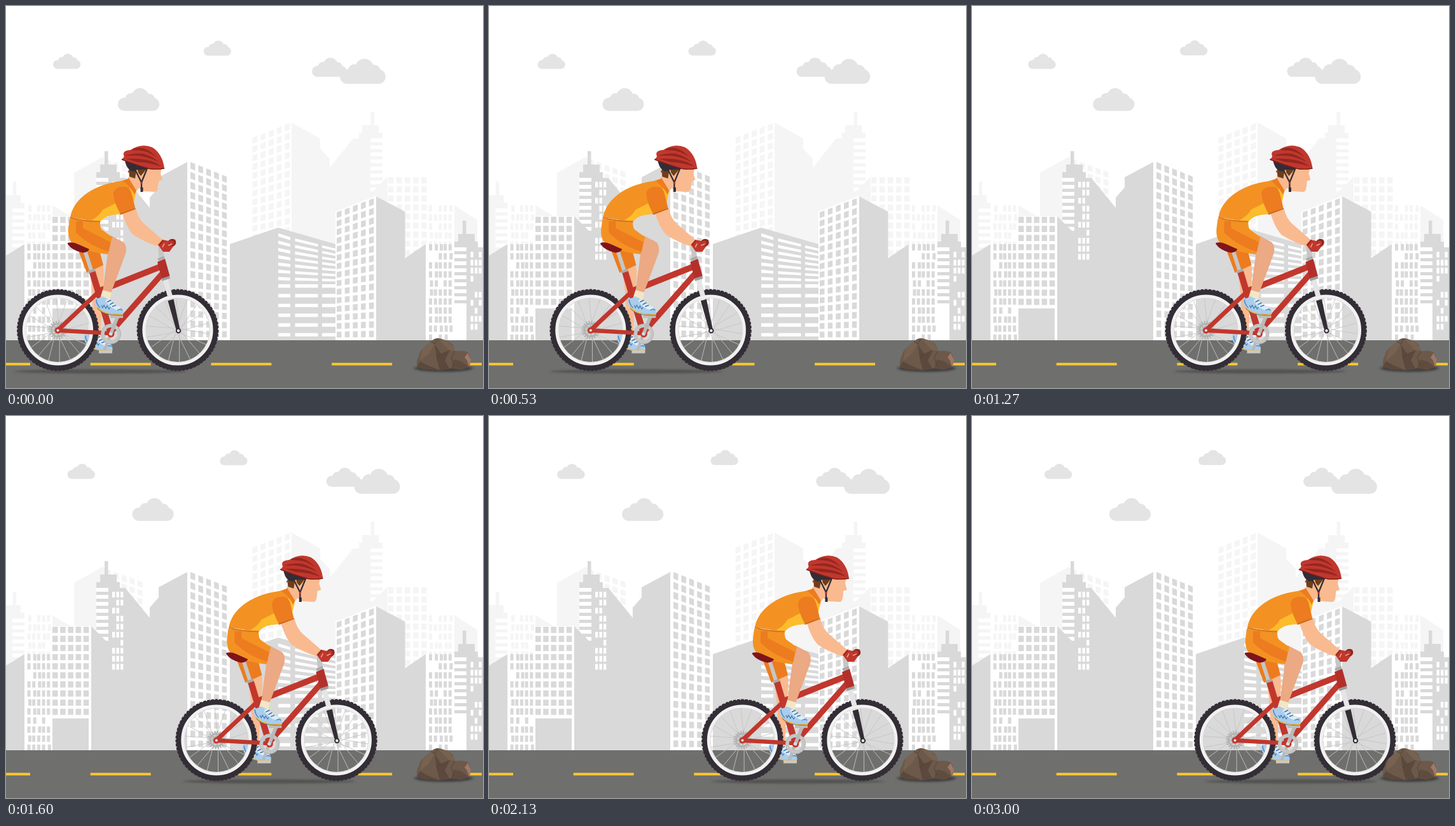
An HTML page that plays this animation: 750x600 px, repeating every 3070 ms.

```html
<!DOCTYPE html>
<html lang="en">
<head>
<meta charset="utf-8">
<title>City ride</title>
<style>
  html, body { margin: 0; width: 100%; height: 100%; overflow: hidden; background: #fff; }
  svg { display: block; width: 750px; height: 600px; }
</style>
</head>
<body>
<svg id="stage" viewBox="0 0 750 600" xmlns="http://www.w3.org/2000/svg"></svg>
<script>
const FAR = '#f5f5f5', NEAR = '#d9d9d9', WHITE = '#fff', DARK = '#332d36';
const RED = '#c1372d', DEEP = '#93271f', STEEL = '#c6c6c6';
const ORANGE = '#f39223', RUST = '#ec7c1f', YELLOW = '#fdbc2c';
const SKIN = '#f9ba90', TAN = '#eba984';

// --- markup helpers ---
const fill = (d, c) => `<path d="${d}" fill="${c}"/>`;
const line = (d, c, w, extra = '') =>
  `<path d="${d}" fill="none" stroke="${c}" stroke-width="${w}" ${extra}/>`;
const rect = (x, y, w, h, c) => `<rect x="${x}" y="${y}" width="${w}" height="${h}" fill="${c}"/>`;
const disc = (x, y, r, c) => `<circle cx="${x}" cy="${y}" r="${r}" fill="${c}"/>`;
const ring = (x, y, r, c, w, extra = '') =>
  `<circle cx="${x}" cy="${y}" r="${r}" fill="none" stroke="${c}" stroke-width="${w}" ${extra}/>`;
const group = (id, body) => `<g id="${id}">${body}</g>`;
const times = (n, f) => Array.from({ length: n }, (_, i) => f(i)).join('');

let seed = 11;
const random = () => (seed = (seed * 16807) % 2147483647) / 2147483647;

// --- buildings ---
// Window wall whose roof runs from yL to yR and whose foot is level at yB.
function wall(x0, cols, pitch, w, yL, yR, yB, rows, color, part = 0.68) {
  const span = (cols - 1) * pitch + w;
  const at = (x, f) => {
    const top = yL + (yR - yL) * (x - x0) / span;
    return `${x.toFixed(1)} ${(top + (yB - top) * f).toFixed(1)}`;
  };
  let d = '';
  for (let c = 0; c < cols; c++) for (let r = 0; r < rows; r++) {
    const a = x0 + c * pitch, b = a + w, f = r / rows, g = (r + part) / rows;
    d += `M${at(a, f)}L${at(b, f)}L${at(b, g)}L${at(a, g)}Z`;
  }
  return fill(d, color);
}

// Ribbon windows: sloping above, level below.
const ribbons = (x, w, yL, yR) =>
  wall(x, 1, w, w, yL, yR, 437, 7, WHITE, 0.45) + wall(x, 1, w, w, 437, 437, 529, 6, WHITE, 0.35);

function flats(x, y, rows, c) {
  let out = '';
  for (let r = 0; r < rows; r++) for (let i = 0; i < 5; i++) {
    const shift = random() < 0.3 ? 1.5 : 0;
    if (random() > 0.07) out += rect(x + i * 7.7 + shift, y + r * 14.2, 5, 10, c);
  }
  return out;
}

// Stepped top with a mast; the striped side starts at the given edge.
function tower(edge, y, dir, c) {
  const bar = (a, w, dy, h) => rect(dir > 0 ? edge + a : edge - a - w, y + dy, w, h, c);
  return bar(13, 5.5, 0, 22) + bar(6, 26, 21, 13) + bar(0, 37, 33, 9) +
    times(8, i => bar(0, 19, 48 + i * 11, 5));
}

function lights(x, y, rows) {
  let out = '';
  for (let r = 0; r < rows; r++) for (let i = 0; i < 3; i++)
    if (random() > 0.32) out += rect(x + i * 6.5, y + r * 12.6, 4.3, 9, WHITE);
  return out;
}

function city() {
  const far =
    tower(29, 276, -1, FAR) + rect(0, 318, 10, 100, FAR) +
    flats(33.5, 313, 5, FAR) +
    fill('M73 313L107 333V420H73Z M107 262L152 237L157 240V400H107Z', FAR) +
    wall(157, 5, 12.4, 8, 240, 261, 525, 20, FAR) +
    wall(387.5, 5, 12.7, 8, 207, 184, 525, 23, FAR) +
    fill('M449 183L494 208V224L509 240V254L546 208H573V295L600 268V525H449Z', FAR) +
    tower(592, 166, -1, FAR) +
    wall(601, 5, 13, 8.5, 269, 269, 525, 18, FAR) +
    flats(665, 313, 5, FAR) +
    fill('M705 313L741 336V420H705Z', FAR);

  const near =
    rect(29, 374, 44, 151, WHITE) + fill('M0 392L29 374V525H0Z', NEAR) +
    flats(33.5, 374, 11, NEAR) +
    rect(73, 330, 61, 195, WHITE) +
    wall(73, 5, 12.2, 8.5, 331, 331, 474, 10, NEAR) + rect(73, 475, 57, 50, NEAR) +
    rect(142, 270, 19, 88, WHITE) + tower(142, 228, 1, NEAR) +
    fill('M134 330L161 357V270H187.5L226 317V525H134Z', NEAR) + lights(167, 276, 10) +
    fill('M226 301L240 285V269L285 245V525H226Z', NEAR) +
    wall(290, 5, 12.4, 7.5, 245, 268, 525, 18, NEAR) +
    fill('M352 374L428 348L518 374V525H352Z', NEAR) +
    ribbons(428, 19, 357, 363) + ribbons(454.5, 36, 365, 374) + ribbons(497, 21, 376, 381) +
    fill('M518 323L582 298V525H518Z', WHITE) +
    wall(520, 5, 12.7, 7.5, 324, 302, 525, 15, NEAR) +
    fill('M582 299L627.5 323V396L660 374V525H582Z', NEAR) +
    rect(660, 374, 45, 151, WHITE) + flats(665, 374, 11, NEAR) +
    rect(705, 379, 19, 146, WHITE) + tower(705, 337, 1, NEAR) +
    rect(724, 379, 26, 146, NEAR) + lights(730.5, 386, 10);

  const road = rect(0, 525, 750, 75, '#6f6f6e') +
    times(5, i => {
      const x = -57 + i * 189.7;
      return rect(x, 560.5, Math.min(95, 748 - x), 4, '#ffc72f');
    });
  return far + near + road;
}

// --- clouds ---
const cloud = (x, y, s) => `<g transform="translate(${x} ${y}) scale(${s})" fill="#e4e4e4">
  <rect y="10" width="43.3" height="13.7" rx="6.8"/><circle cx="23.2" cy="8.8" r="8.8"/>
  <circle cx="14" cy="11.5" r="6.4"/><circle cx="32.3" cy="11.8" r="6.2"/>
  <rect x="14" y="9" width="18" height="9"/></g>`;

// --- bicycle ---
function wheel(x, y) {
  const spokes = times(18, i => {
    const a = (i * 20 + 7) * Math.PI / 180, b = a + (i % 2 ? 0.5 : -0.5);
    return `M${x + 5 * Math.cos(b)} ${y + 5 * Math.sin(b)}L${x + 51 * Math.cos(a)} ${y + 51 * Math.sin(a)}`;
  });
  return line(spokes, '#c4c4c4', 0.9) +
    ring(x, y, 50.5, '#cfcfcf', 1) + ring(x, y, 53.3, '#f1f1f1', 5.6) +
    ring(x, y, 59.4, DARK, 7.6) + ring(x, y, 63.4, DARK, 2, 'stroke-dasharray="4.4 1.9"');
}

function shoe(x, y) {
  return `<g transform="translate(${x} ${y})">` +
    fill('M1 2Q5 5 11 0L20 4Q30 13 41 17Q46 23 44 29L24 28Q9 25 3 17Q-2 9 1 2Z', '#aacdec') +
    fill('M20 4Q30 13 41 17L36 22Q24 19 16 7Z', '#dcebf7') +
    line('M19 9L25 6M23 13L29 10M27 16L33 14', '#3f74a8', 1.5) +
    line('M2 5Q2 12 8 18M35 22Q40 19 43 22', '#4b86bd', 1.4) +
    line('M10 14L12 18L14 14L17 19L19 15L22 20L24 17', '#3f74a8', 1.1) +
    line('M3 17Q10 25 24 27.5L44 28.5', '#f0b83c', 2) +
    line('M4 19Q11 27 24 29L43 30', '#54708b', 1) + '</g>';
}

function farLeg() {
  return fill('M131 408L152 402Q156 425 151 447Q150 485 148 520L137 518Q138 470 135 444Z', SKIN) +
    fill('M113 382L147 384L153 407L127 419Z', RUST) +
    fill('M136 510H149L152 525L135 523Z', '#f2e6c6') + shoe(123, 513) +
    line('M165 514L155 541', '#b9b9b9', 5) + rect(146, 541, 21, 4.5, '#c9c9c9');
}

function bike() {
  return wheel(81.5, 509) + wheel(270, 509) +
    disc(81.5, 509, 11.5, '#b3b3b3') + ring(81.5, 509, 13, '#b3b3b3', 3, 'stroke-dasharray="2.2 1.9"') +
    ring(81.5, 509, 7.5, '#d4d4d4', 2, 'stroke-dasharray="4 2"') +
    line('M124 384L135 418', STEEL, 6) +
    line('M243 378L245 400', STEEL, 8) +
    line('M250 427L258 456', '#e5e5e5', 8) +
    fill('M254.5 463L263.5 460.5L273.5 508L268 510Z', DARK) +
    disc(271, 510, 4.2, DARK) + disc(271, 510, 2.2, '#e8e8e8') +
    line('M81 509.5L163 514', RED, 6.5) + line('M81 509.5L150 445', RED, 7) +
    line('M135.5 417L164 512', RED, 10) + line('M129.5 418L140 414.5', '#aaa', 4) +
    line('M148 447L244 409', RED, 9.5) + line('M165 512L246 420', RED, 9) +
    fill('M238 402L250 397L257.5 424L245 430Z', '#b3302a') +
    line('M245 430L257.5 426', '#9d9d9d', 4) + line('M239 398.5L249 394.5', '#aaa', 4) +
    disc(81.5, 509.5, 4.8, RED) + disc(81.5, 509.5, 2, '#f0e4e2') +
    ring(165, 515, 13, STEEL, 5.5) + ring(165, 515, 15.5, '#b5b5b5', 1) +
    disc(165, 515, 5.5, RED) + line('M164 517L175 489', '#b9b9b9', 5.5) +
    disc(164.5, 515, 2.5, '#ddd') + rect(164, 486, 20, 4, '#bcbcbc');
}

// --- rider ---
function body() {
  return fill('M164 360L185 371Q191 378 188 389L165 451L152 449L160 388Z', TAN) +
    fill('M152 446L166 450L163 463L148 459Z', '#f2e6c6') + shoe(140, 456) +
    fill('M100 334L148 338Q147 350 153 353L167 363L160 390Q130 386 115 380Q96 372 98 350Z', ORANGE) +
    fill('M110 338H121V349L164.5 371L161.5 386Q130 376 110 356Z', RUST) +
    fill('M97 372Q105 370 113 374L131 382Q129 387 120 387.5Q104 384 97 374Z', '#7f141b') +
    fill('M101 332Q104 313 122 298Q144 280 180 275L193 271L204 291L200 305L178 327Q156 327 148 339Z', ORANGE) +
    fill('M133 337.5Q148 329 152 320L174 309L181 327Q156 327 148 339Z', YELLOW) +
    line('M101 332.5Q122 338.5 148 338.5', '#d8741b', 2) +
    fill('M183 326L204 318Q208 334 217 342L247 368L241 378Q220 372 201 360Q191 351 183 326Z', SKIN) +
    fill('M194 286L205 291L201 308Z', YELLOW) +
    fill('M169 293Q173 282 188 284Q196 286 198 296L203 317L180 327Q168 305 169 293Z', RUST) +
    line('M179.5 327L203.5 318', '#cf6a18', 2) +
    fill('M239 375L246 367L255 369Q259 364 266 367Q269 373 262 379L257 386L247 386Z', RED) +
    disc(261.5, 371.5, 5.8, DEEP) + disc(260, 372, 3.6, RED) +
    line('M246 379L249 373M255 376L261 374', '#f0a98f', 1.6) + line('M241 376L247 368', DEEP, 1.5);
}

function head() {
  return fill('M191 271L206 253H245L243 263L246 273L240 275Q240 291 235 292L217 291L209 286L204 292Z', SKIN) +
    fill('M184 275L193 270.5L205 290L202 296Q196 284 184 275Z', RUST) +
    fill('M193 257L205 258L203 271L194 268Z M206 254H222L217 261L212 267L208 262Z', '#6d3e1c') +
    fill('M187 243L226 254L220 257H207L200 260Q190 258 187 243Z', DARK) +
    line('M203 257L213 277L222 255M213 277V287', DARK, 2.3) +
    line('M213.5 285V292', DARK, 4) + disc(213, 278, 1.8, RED) + disc(193, 260, 1.5, RED) +
    fill('M181.5 241Q187 238 185 234Q183 227 196 226Q213 215 230 222Q246 232 249 255Q238 258 225 256Q200 248 181.5 241Z', RED) +
    fill('M197 226Q210 220 220 225Q229 229 236 237Q223 228 212 227Z M187 235Q204 230 216 232Q232 237 240 245Q222 236 205 235Z M189 240Q208 239 222 242Q236 245 244 252Q226 246 206 245Z', DEEP) +
    line('M182 241Q202 249 225 255.5Q238 257.5 249 255', '#7d1e1a', 1.4);
}

function rock() {
  return '<ellipse cx="688" cy="569" rx="46" ry="6" fill="#333" opacity=".75" filter="url(#soft)"/>' +
    fill('M646 566Q645 555 649 550Q651 541 655 538L668 527Q674 521 682 522L694 526Q703 530 704 536L706 542Q722 540 727 545Q733 556 728 567L716 571L700 569L682 572L655 570Z', '#6d5949') +
    fill('M655 538L668 527L674 531L664 547L651 557Z M679 522L694 526L704 536L706 542L696 540Z', '#776251') +
    fill('M674 531L684 546L698 540L690 557L697 569L682 572L677 553Z M646 566L651 558L664 565L682 572L655 570Z', '#5a493c') +
    fill('M704 555L716 558L728 567L716 571L700 569Z', '#604c3f') +
    fill('M726 545L731 556L728 567L725 557L721 552Z', '#a17867') +
    line('M668 527L674 531L679 522M684 546L677 553M706 542L700 552L704 565', '#4d3d32', 0.8);
}

// --- scene ---
const defs = `<defs><filter id="soft" x="-20%" y="-150%" width="140%" height="400%">
  <feGaussianBlur stdDeviation="2.5 1.5"/></filter></defs>`;
const stage = document.getElementById('stage');
stage.innerHTML = defs + city() +
  group('clouds', cloud(74, 75, 1) + cloud(175.8, 129, 1.51) + cloud(481, 81.3, 1.26) + cloud(525, 83, 1.66)) +
  group('puff', cloud(310.7, 54.2, 1)) +
  group('shadow', '<ellipse cx="148.5" cy="574" rx="136" ry="3.2" fill="#484848" opacity=".75" filter="url(#soft)"/>') +
  group('rider', farLeg() + bike() + body() + head()) + rock();

// --- motion ---
const LOOP = 3070, RIDE = 3000, STEP = 200 / 3;
const bounceOut = u => {
  const n = 7.5625, d = 2.75;
  if (u < 1 / d) return n * u * u;
  if (u < 2 / d) return n * (u - 1.5 / d) ** 2 + 0.75;
  if (u < 2.5 / d) return n * (u - 2.25 / d) ** 2 + 0.9375;
  return n * (u - 2.625 / d) ** 2 + 0.984375;
};
const easeInOut = u => u < 0.5 ? 2 * u * u : 1 - 2 * (1 - u) ** 2;

const parts = Object.fromEntries(['clouds', 'puff', 'shadow', 'rider']
  .map(id => [id, document.getElementById(id)]));
const move = (id, x, y = 0) => parts[id].setAttribute('transform', `translate(${x.toFixed(2)} ${y.toFixed(2)})`);

// Fifteen steps a second, each on a whole hundredth.
const stepTime = ms => Math.min(RIDE, Math.round(Math.floor((ms % LOOP + 3.4) / STEP) * STEP / 10) * 10);

function draw(ms) {
  const u = stepTime(ms) / RIDE;
  const ride = bounceOut(u), drift = easeInOut(u);
  move('rider', 332 * ride);
  move('shadow', 353 * ride);
  move('clouds', 40 * drift);
  move('puff', 45.3 * drift, -drift);
}

const start = performance.now();
function tick() {
  draw(performance.now() - start);
  requestAnimationFrame(tick);
}
tick();
</script>
</body>
</html>
```
